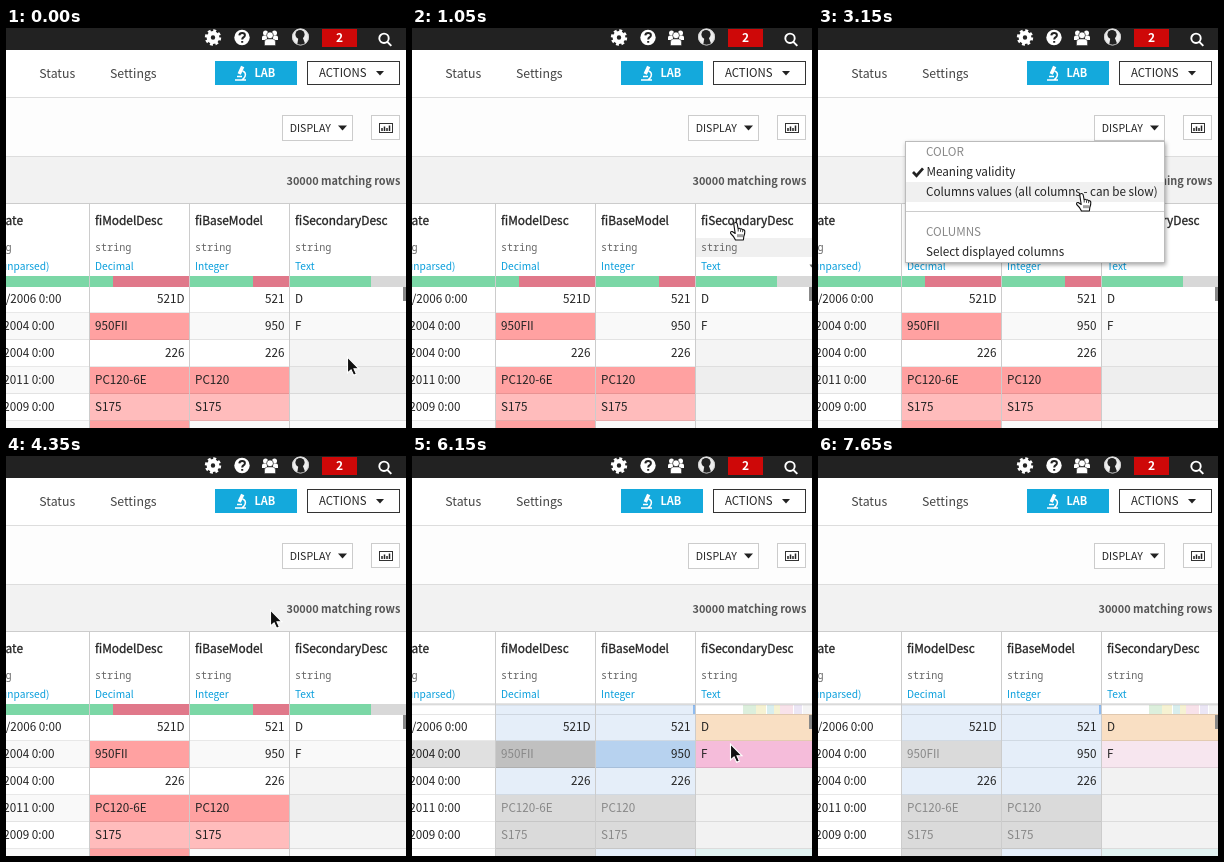
An HTML page that plays this animation: 400 by 400 pixels, repeating every 8100 ms.

```html
<!DOCTYPE html>
<html lang="en">
<head>
<meta charset="utf-8">
<title>Column colouring</title>
<style>
html, body { margin: 0; width: 100%; height: 100%; overflow: hidden; background: #fff; }
svg { display: block; width: 100%; height: 100%; }
text { font: 11.7px "Noto Sans CJK JP", "Noto Sans CJK SC", "Noto Sans CJK", "Open Sans", sans-serif; fill: #222; white-space: pre; }
.nav { font-size: 12.3px; fill: #444; }
.bold { font-weight: 700; }
.head { font-size: 11.9px; stroke: #222; stroke-width: .3px; }
.mono { font: 10.1px "Noto Sans Mono", "DejaVu Sans Mono", monospace; fill: #666; }
.kind { font-size: 10.2px; fill: #0a9fdc; }
.dim { fill: #888; }
.mute { fill: #888; }
.end { text-anchor: end; }
.mid { text-anchor: middle; }
</style>
</head>
<body>
<svg id="stage" viewBox="0 0 400 400">
  <defs>
    <clipPath id="reveal"><rect id="wipe" x="80" y="105" width="0" height="140"/></clipPath>
    <clipPath id="face"><circle cx="294.500" cy="9" r="8.500"/></clipPath>
    <filter id="shade" x="-10%" y="-10%" width="120%" height="125%">
      <feDropShadow dx="1" dy="2" stdDeviation="2" flood-opacity=".35"/>
    </filter>
  </defs>
  <rect width="400" height="400" fill="#fff"/>

  <!-- top bar -->
  <rect width="400" height="22" fill="#222"/>
  <g fill="#fff">
    <circle cx="207" cy="9.500" r="4.300" fill="none" stroke="#fff" stroke-width="4.200"/>
    <circle cx="207" cy="9.500" r="6.900" fill="none" stroke="#fff" stroke-width="2.600" stroke-dasharray="2.900 2.520"/>
    <circle cx="236" cy="9.500" r="7.700"/>
    <path d="M233.300 7.400q.2-2.500 2.800-2.500 2.800 0 2.800 2.300 0 1.500-1.600 2.300-1.100.6-1.100 1.900M236.200 13v1.800" fill="none" stroke="#222" stroke-width="2"/>
    <circle cx="259.500" cy="5" r="2.500"/><circle cx="268.500" cy="5" r="2.500"/>
    <path d="M256 12v-2.500q0-2 2-2h3v4.500zM272 12v-2.500q0-2-2-2h-3v4.500z"/>
    <circle cx="264" cy="7.300" r="3.400" stroke="#222" stroke-width=".7"/>
    <path d="M258.500 17.500v-3.500q0-3 3-3h5q3 0 3 3v3.500z" stroke="#222" stroke-width=".5"/>
    <g clip-path="url(#face)">
      <rect x="285" y="0" width="20" height="20" fill="#eee"/>
      <circle cx="294" cy="6.500" r="4.600" fill="#222"/>
      <path d="M292.500 9h4l3.500 9h-9z" fill="#222"/>
    </g>
    <circle cx="294.500" cy="9" r="8" fill="none" stroke="#ccc" stroke-width=".8"/>
  </g>
  <rect x="316" y="1" width="35" height="18" fill="#ce0808"/>
  <text x="333.500" y="13.800" class="bold mid" style="fill:#fff;font-size:12px">2</text>
  <g fill="none" stroke="#fff" stroke-width="1.900"><circle cx="378" cy="10.300" r="4.700"/><path d="M381.300 13.800l4 4"/></g>

  <!-- navigation -->
  <text x="33.300" y="50" class="nav">Status</text>
  <text x="104" y="50" class="nav">Settings</text>
  <rect x="209" y="33" width="82" height="24" fill="#14a9dc"/>
  <g fill="none" stroke="#fff" stroke-width="1.500">
    <path d="M229 52h11M231 48.500h5M236.500 43q4 1.500 2.500 5.500-.8 2-3 3.300"/>
    <path d="M236.700 38.500l-3.500 7.500" stroke-width="3.500"/>
  </g>
  <text x="248.500" y="49.300" class="bold" style="fill:#fff;font-size:11px">LAB</text>
  <rect x="301.500" y="33.500" width="92" height="23" fill="#fff" stroke="#333"/>
  <text x="313" y="49" style="font-size:11.400px">ACTIONS</text>
  <path d="M370 43h8l-4 4.500z" fill="#222"/>
  <path d="M0 69.500h400M0 128.500h400" stroke="#ddd"/>

  <!-- toolbar -->
  <rect x="0" y="70" width="400" height="58" fill="#fdfdfd"/>
  <rect id="button" x="276.500" y="87.500" width="70" height="25" stroke="#ccc"/>
  <rect id="mark" x="320" y="92" width="6.500" height="16" fill="#aecbf2"/>
  <text x="283.700" y="104.300" style="font-size:10.600px">DISPLAY</text>
  <path d="M332 97.500h9l-4.500 5z" fill="#222"/>
  <rect x="365.500" y="87.500" width="28" height="24" fill="#fff" stroke="#ccc"/>
  <rect x="373.500" y="95.500" width="13" height="9" fill="none" stroke="#333"/>
  <path d="M376 103v-3M378.500 103v-4.500M381 103v-3M383.500 103v-5.500" stroke="#222" stroke-width="1.500"/>
  <rect y="129" width="400" height="46" fill="#f2f2f2"/>
  <text x="394.300" y="156.500" class="bold end" style="fill:#555;font-size:10.900px">30000 matching rows</text>

  <!-- table -->
  <rect id="cell" fill="#f0f0f0"/>
  <g id="table"></g>
  <path d="M397 259v14h3v-14z" fill="#888"/>
  <path d="M0 175.500h400M83.500 176v224M183.500 176v224M283.500 176v224" stroke="#ccc" fill="none"/>
  <path id="caret" d="M397.500 236.500h4l-2 3z" fill="#666"/>

  <!-- drop-down -->
  <g id="menu" clip-path="url(#reveal)">
    <rect x="87.500" y="113.500" width="259" height="121" fill="#fff" stroke="#bbb" filter="url(#shade)"/>
    <rect id="item" x="88" width="258" height="20" fill="#f0f0f0"/>
    <path d="M88 183.500h258" stroke="#ccc"/>
    <path d="M95 144l3.500 3.700 6.500-7.400" fill="none" stroke="#222" stroke-width="2.700"/>
    <text x="108" y="128" class="mute">COLOR</text>
    <text x="108.500" y="148">Meaning validity</text>
    <text x="108" y="168">Columns values (all columns - can be slow)</text>
    <text x="108" y="208" class="mute">COLUMNS</text>
    <text x="108" y="228">Select displayed columns</text>
  </g>

  <path id="arrow" d="M-.5-1v16l3.600-3.200 2.500 5.500 2.800-1.200-2.400-5.300h5z" fill="#111" stroke="#fff" stroke-width="1.100"/>
  <g id="hand" stroke="#111" stroke-width="1.100" stroke-linejoin="round">
    <path d="M-2.300.7Q-.8-1.600 1.100.5L2.100 5.600Q3.400 4.700 4.300 6 5.500 5.300 6.500 6.700 8.300 6.400 8.800 8 9 10.500 7.800 13.500L7.400 17H-.5Q-1.700 13.800-5.300 10.500-5.900 8.200-3.800 8.500L-.8 10.500z" fill="#fff"/>
    <path d="M2.200 6v2.500M4.500 6.500v2.300M6.600 7.200v2M2 11.200v3M4 11.200v3M6 11.200v3" stroke-width=".8"/>
  </g>
</svg>
<script>
const LOOP = 8100, STEP = 150, RECOLOUR = 4650;
const $ = id => document.getElementById(id);
const left = [0, 84, 184, 284], width = [83, 99, 99, 116];
const rowTop = r => 258 + 27 * r;

const names = ["saledate", "fiModelDesc", "fiBaseModel", "fiSecondaryDesc"];
const kinds = ["Date (unparsed)", "Decimal", "Integer", "Text"];
const rows = [
  ["16/2006 0:00", "521D", "521", "D"],
  ["26/2004 0:00", "950FII", "950", "F"],
  ["26/2004 0:00", "226", "226", ""],
  ["19/2011 0:00", "PC120-6E", "PC120", ""],
  ["23/2009 0:00", "S175", "S175", ""],
  ["", "", "", ""]
];
// w = plain, b = number, g = text in a number column, e = empty, others = categories
const looks = ["wbbo", "wgbp", "wbbe", "wgge", "wgge", "wgbt"];
const invalid = ["", "1", "", "12", "12", "1"];
const plain = { w: "#fff", b: "#e5eef9", g: "#dadada", o: "#f9dfc3", p: "#f7e6ef", e: "#f2f2f2", t: "#e1f2f1" };
const lit = { w: "#e0e0e0", b: "#b7d2ef", g: "#c0c0c0", o: "#f5c592", p: "#f5bcda", e: "#e0e0e0", t: "#b5e0dc" };

const box = (x, y, w, h, fill) => `<rect x="${x}" y="${y}" width="${w}" height="${h}" fill="${fill}"/>`;
const label = (x, y, s, cls = "") => `<text x="${x}" y="${y}" class="${cls}">${s}</text>`;

function validityFill(r, c) {
  if (invalid[r].includes(c)) return r % 2 ? "#ffa1a1" : "#ffbcbc";
  if (looks[r][c] === "e") return r % 2 ? "#eee" : "#f4f4f4";
  return r % 2 ? "#f9f9f9" : "#fff";
}

function bars(coloured) {
  if (!coloured) {
    const good = [83, 23, 63, 81];
    return left.map((x, c) => box(x, 248, width[c], 11, c === 3 ? "#d8d8d8" : "#e0788a")
      + box(x, 248, good[c], 11, "#7bd7a6")).join("");
  }
  const slices = [[331, 13, "#dcefdc"], [344, 10, "#f6f2d2"], [355, 7, "#d8eeee"], [362, 6, "#f6f2d2"], [368, 13, "#f8e2ea"], [382, 8, "#ebe6f5"], [391, 9, "#f4f4f4"]];
  return box(84, 249, 99, 9, plain.b) + box(184, 249, 99, 9, plain.b) + box(281, 249, 2, 9, "#8fbcf0")
    + slices.map(([x, w, f]) => box(x, 248, w, 10, f)).join("")
    + box(0, 247, 400, 1, "#e4e4e4") + box(0, 248, 400, 1, "#dadada") + box(0, 249, 400, 1, "rgba(0,0,0,.05)")
    + box(0, 258, 400, 1, "rgba(0,0,0,.1)");
}

function tableMarkup(coloured, hot) {
  let out = "";
  left.forEach((x, c) => {
    const ends = [17, 5.5, 43.5], first = c === 0;
    out += label(first ? ends[0] : x + 5, 197, names[c], first ? "head end" : "head")
      + label(first ? ends[1] : x + 5, 223, "string", first ? "mono end" : "mono")
      + label(first ? ends[2] : x + 5, 242, kinds[c], first ? "kind end" : "kind");
  });
  rows.forEach((cells, r) => {
    const y = rowTop(r);
    cells.forEach((s, c) => {
      const look = looks[r][c];
      out += box(left[c], y, width[c], 27, coloured ? (r === hot ? lit : plain)[look] : validityFill(r, c));
      const number = look === "b" && c, grey = coloured && look === "g";
      const x = c === 0 ? (r ? 48.5 : 55.5) : number ? left[c] + 94.5 : left[c] + 5;
      out += label(x, y + 17, s, (c === 0 || number ? "end " : "") + (grey ? "dim" : ""));
    });
    out += box(0, y + 26, 400, 1, "rgba(0,0,0,.09)");
  });
  return out + bars(coloured);
}

// [start, end, x, y, ease] : travel to x, y between the two times
const smooth = p => p * p * (3 - 2 * p), out = p => p * (1.2 - .2 * p);
const moves = [
  [0, 1050, 324, 195], [1050, 1800, 325, 105], [2100, 3150, 264, 166],
  [3150, 3300, 261, 165], [3450, 3600, 263.5, 160.5], [3750, 4050, 265, 156.5],
  [4200, 4350, 265, 155], [4800, 4950, 265, 154], [5250, 6150, 319, 289, out],
  [6300, 6450, 318, 288.5], [6600, 6750, 319, 288], [6900, 7650, 345, 406, out]
];

function pointer(t) {
  let x = 342, y = 330;
  for (const [a, b, tx, ty, ease = smooth] of moves) {
    if (t <= a) break;
    const p = ease(Math.min(1, (t - a) / (b - a)));
    x += (tx - x) * p;
    y += (ty - y) * p;
  }
  return [x, y];
}

const show = (id, on) => $(id).setAttribute("visibility", on ? "visible" : "hidden");
const set = (id, attrs) => { for (const k in attrs) $(id).setAttribute(k, attrs[k]); };
let drawn = "";

function draw(t) {
  const [x, y] = pointer(t);
  const open = t >= 1950 && t < 3300, coloured = t >= RECOLOUR;
  const col = left.findLastIndex(l => x >= l);
  const onButton = x > 276 && x < 347 && y > 88 && y < 113;
  const onHead = !open && y > 176 && y < 248;
  const onMenu = open && y >= 114;

  const hot = coloured && y >= 258 && y < 400 ? Math.floor((y - 258) / 27) : -1;
  const key = coloured + ":" + hot;
  if (key !== drawn) {
    $("table").innerHTML = tableMarkup(coloured, hot);
    drawn = key;
  }

  const [top, bottom] = y < 190 ? [176, 210] : y < 229 ? [210, 229] : [229, 248];
  set("cell", { x: left[col], width: width[col], y: top, height: bottom - top });
  show("cell", onHead);
  show("caret", onHead && col === 3);

  set("button", { fill: onButton ? "#ddd" : "#fff" });
  show("mark", open && onButton);

  show("menu", open);
  set("wipe", { width: t < 2100 ? 120 : 280 });
  const row = Math.floor((y - 134) / 20);
  set("item", { y: 134 + 20 * row });
  show("item", onMenu && (row === 0 || row === 1));

  const hand = onButton || onHead || onMenu;
  for (const id of ["arrow", "hand"]) set(id, { transform: `translate(${x.toFixed(1)} ${y.toFixed(1)})` });
  show("hand", hand);
  show("arrow", !hand && y < 400);
}

function tick() {
  draw(Math.floor(performance.now() % LOOP / STEP) * STEP);
  requestAnimationFrame(tick);
}
tick();
</script>
</body>
</html>
```
